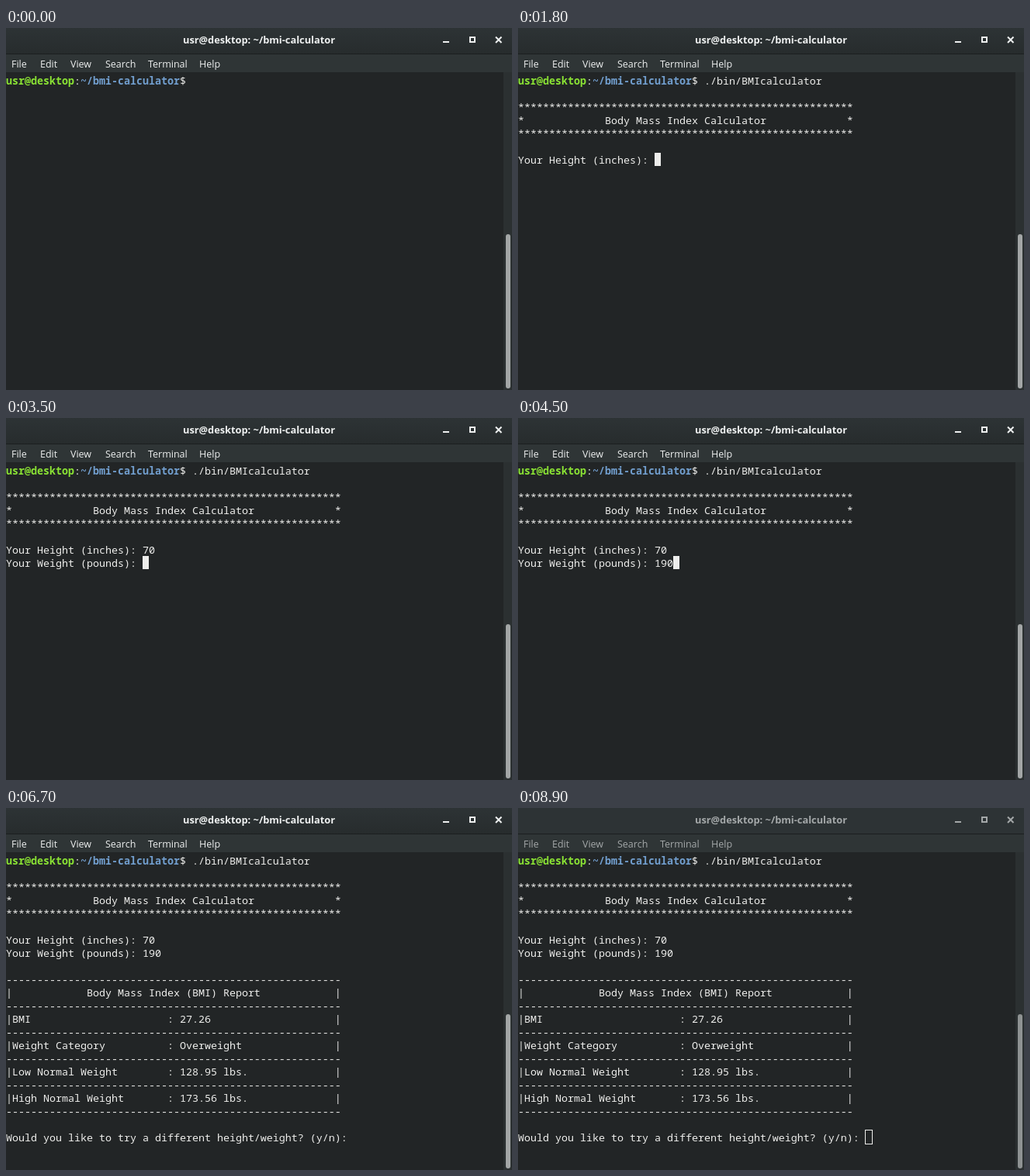
An HTML page with a canvas that plays this animation: 652 px wide and 467 px high, repeating every 9000 ms.

```html
<!DOCTYPE html>
<html lang="en">
<head>
<meta charset="utf-8">
<title>Terminal</title>
<style>
  html, body { margin: 0; width: 100%; height: 100%; overflow: hidden; background: #222526; }
  canvas { display: block; }
</style>
</head>
<body>
<canvas id="stage" width="652" height="467"></canvas>
<script>
const ctx = document.getElementById('stage').getContext('2d');
const LOOP = 9000, COL = 8, ROW = 17, TOP = 59;
const MONO = '13.333px "Noto Sans Mono", monospace';
const WHITE = '#eeeeec';

const stars = '*'.repeat(54), dashes = '-'.repeat(54);
const boxed = (edge, s) => edge + s.padEnd(52) + edge;
const field = (name, value) => boxed('|', name.padEnd(25) + ': ' + value);

// Pieces of terminal text, in the order they appear; the prompt is painted apart.
const chunks = [
  ' '.repeat(30),
  './bin/BMIcalculator',
  ['', '', stars, boxed('*', ' '.repeat(13) + 'Body Mass Index Calculator'), stars, '',
    'Your Height (inches): '].join('\n'),
  '7',
  '0',
  '\nYour Weight (pounds): ',
  '19',
  '0',
  ['', '', dashes, boxed('|', ' '.repeat(12) + 'Body Mass Index (BMI) Report'), dashes,
    field('BMI', '27.26'), dashes,
    field('Weight Category', 'Overweight'), dashes,
    field('Low Normal Weight', '128.95 lbs.'), dashes,
    field('High Normal Weight', '173.56 lbs.'), dashes, '',
    'Would you like to try a different height/weight? (y/n): '].join('\n'),
];

// [start ms, chunks shown, cursor]
const OFF = 0, SOLID = 1, HOLLOW = 2;
const steps = [
  [0, 1, OFF], [300, 1, SOLID], [600, 2, SOLID], [1200, 2, OFF],
  [1800, 3, SOLID], [2100, 3, OFF], [2600, 4, SOLID], [2700, 5, SOLID],
  [3200, 5, OFF], [3400, 5, SOLID], [3500, 6, SOLID], [4200, 7, SOLID],
  [4500, 8, SOLID], [5000, 9, SOLID], [6000, 9, OFF], [6100, 9, SOLID],
  [6700, 9, OFF], [7300, 9, SOLID], [7900, 9, OFF], [8800, 9, HOLLOW],
];

const menu = [['File', 7], ['Edit', 44], ['View', 83], ['Search', 128], ['Terminal', 183], ['Help', 249]];

function rect(x, y, w, h, color) {
  ctx.fillStyle = color;
  ctx.fillRect(x, y, w, h);
}

function text(s, x, y, color, font) {
  ctx.font = font;
  ctx.fillStyle = color;
  ctx.fillText(s, x, y);
}

const mix = (a, b, k) => `rgb(${a.map((v, i) => Math.round(v + (b[i] - v) * k))})`;

function drawWindow(dim) {
  rect(0, 0, 652, 467, '#222526');

  const header = ctx.createLinearGradient(0, 0, 0, 33);
  header.addColorStop(0, '#2d3335');
  header.addColorStop(1, mix([39, 44, 45], [45, 51, 53], dim));
  rect(0, 0, 652, 33, header);
  rect(0, 33, 652, 1, '#1b1e1f');
  rect(0, 34, 652, 23, '#2f3536');

  const ink = mix([238, 240, 240], [164, 168, 169], dim);
  ctx.textAlign = 'center';
  text('usr@desktop: ~/bmi-calculator', 326, 20, ink, 'bold 12.8px "Open Sans", sans-serif');
  ctx.textAlign = 'left';
  for (const [label, x] of menu) text(label, x, 51, ink, '12.5px "Open Sans", sans-serif');

  rect(563, 17, 8, 2, ink);
  ctx.strokeStyle = ink;
  ctx.lineWidth = 2;
  ctx.strokeRect(598, 12, 6, 6);
  ctx.beginPath();
  ctx.moveTo(631, 11.5); ctx.lineTo(638.5, 19);
  ctx.moveTo(638.5, 11.5); ctx.lineTo(631, 19);
  ctx.stroke();

  rect(641, 57, 11, 410, '#2b3031');
  ctx.fillStyle = mix([163, 166, 166], [142, 146, 146], dim);
  ctx.beginPath();
  ctx.roundRect(644, 266, 6, 199, 3);
  ctx.fill();
}

function drawTerminal(count, cursor) {
  const base = TOP + 14;
  text('usr@desktop', 0, base, '#8ae234', 'bold ' + MONO);
  text(':', 11 * COL, base, WHITE, MONO);
  text('~/bmi-calculator', 12 * COL, base, '#729fcf', 'bold ' + MONO);
  text('$', 28 * COL, base, WHITE, MONO);

  const lines = chunks.slice(0, count).join('').split('\n');
  lines.forEach((line, i) => text(line, 0, base + i * ROW, WHITE, MONO));

  const x = lines.at(-1).length * COL, y = TOP + (lines.length - 1) * ROW;
  if (cursor === SOLID) rect(x, y, COL, ROW, WHITE);
  if (cursor === HOLLOW) {
    ctx.strokeStyle = WHITE;
    ctx.lineWidth = 1;
    ctx.strokeRect(x - 0.5, y - 0.5, COL + 1, ROW + 1);
  }
}

function draw() {
  const t = performance.now() % LOOP;
  const [, count, cursor] = steps.findLast(step => step[0] <= t);
  drawWindow(t < 8800 ? 0 : t < 8900 ? 0.5 : 1);
  drawTerminal(count, cursor);
  requestAnimationFrame(draw);
}
draw();
</script>
</body>
</html>
```
